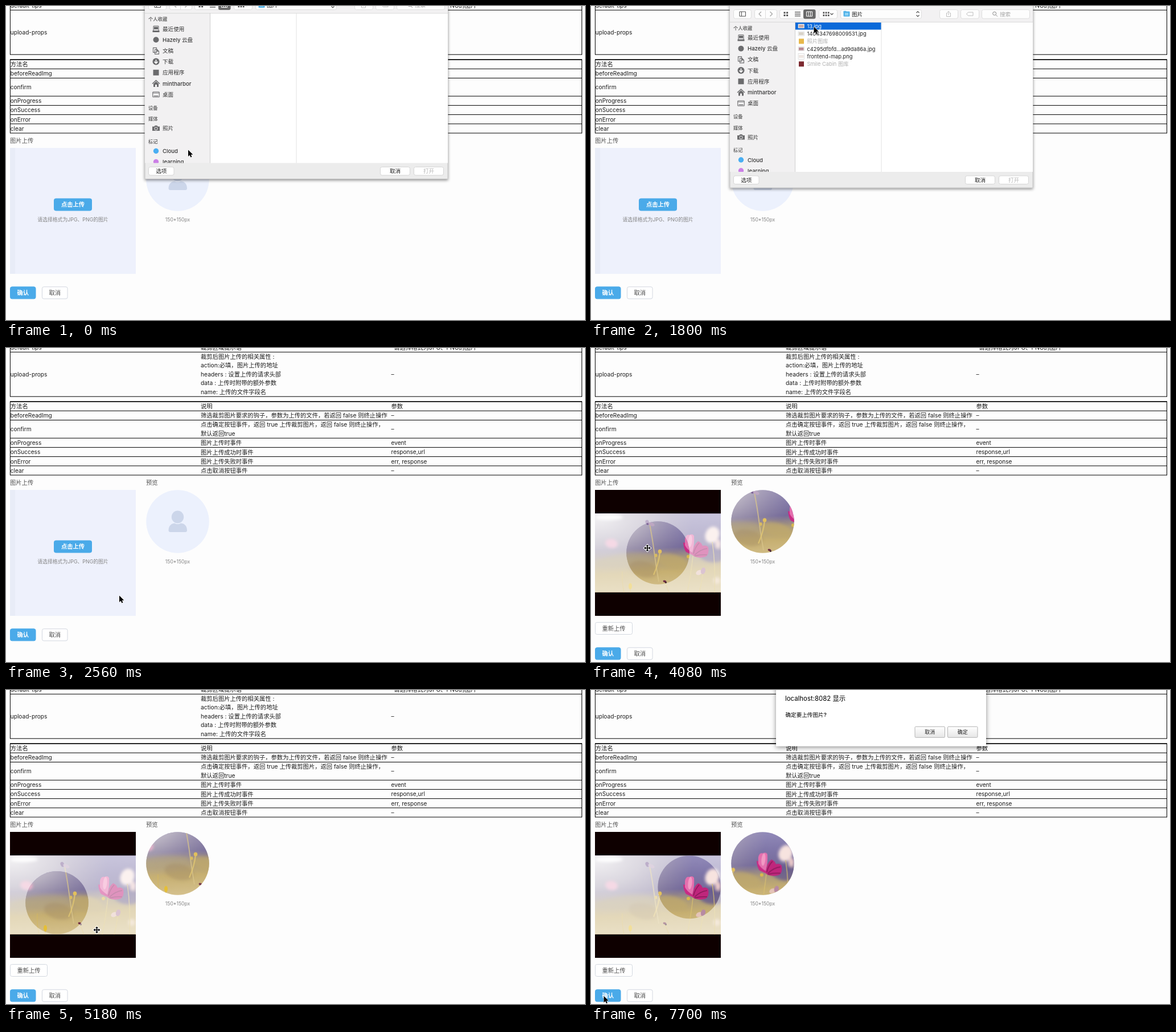
These frames come from a looping animation (1017 px wide and 551 px high, 8000 ms). An HTML page:

```html
<!DOCTYPE html>
<html lang="zh">
<head>
<meta charset="utf-8">
<title>图片上传</title>
<style>
html, body { margin: 0; width: 100%; height: 100%; overflow: hidden; background: #fdfdfd; }
svg { display: block; width: 100%; height: 100%; }
text { font-family: Inter, "Noto Sans CJK SC", "Noto Sans CJK", sans-serif; white-space: pre; }
</style>
</head>
<body>
<svg id="stage" viewBox="0 0 1017 551" preserveAspectRatio="none"></svg>
<script>
const LOOP = 8000;
const stage = document.getElementById('stage');
const $ = id => document.getElementById(id);

// Markup helpers; text is placed by its vertical centre.
const rect = (x, y, w, h, fill, extra = '') =>
  `<rect x="${x}" y="${y}" width="${w}" height="${h}" fill="${fill}" ${extra}/>`;
const circle = (x, y, r, fill, extra = '') =>
  `<circle cx="${x}" cy="${y}" r="${r}" fill="${fill}" ${extra}/>`;
const ellipse = (x, y, rx, ry, fill, turn = 0, extra = '') =>
  `<ellipse rx="${rx}" ry="${ry}" fill="${fill}" transform="translate(${x} ${y}) rotate(${turn})" ${extra}/>`;
const path = (d, stroke, width = 1, fill = 'none', extra = '') =>
  `<path d="${d}" stroke="${stroke}" stroke-width="${width}" fill="${fill}" ${extra}/>`;
const blob = (d, fill) => path(d, 'none', 0, fill);
const text = (x, mid, str, { size = 10.31, fill = '#1c1c1c', weight = 400, anchor = 'start' } = {}) =>
  `<text x="${x}" y="${(mid + size * 0.37).toFixed(2)}" text-anchor="${anchor}" font-weight="${weight}" ` +
  `font-size="${size}" fill="${fill}">${str}</text>`;
const button = (x, y, w, h, label, { fill = '#fff', line = '#d3d8e0', color = '#4a4a4a', size = 10.31, weight = 400, r = 3 } = {}) =>
  rect(x + .5, y + .5, w - 1, h - 1, fill, `rx="${r}" stroke="${line}"`) +
  text(x + w / 2, y + h / 2, label, { size, fill: color, weight, anchor: 'middle' });

const BLUE = '#4aaae9';
const primary = { fill: BLUE, line: BLUE, color: '#fff', weight: 600 };

function tables() {
  const cols = [7.8, 342, 676.5];
  const latin = /^[\x00-\x7f]+$/;
  const cell = (x, mid, s) => text(x, mid, s, { size: latin.test(s) ? 10.08 : 10.31 });
  const row = (mid, ...cells) => cells.map((c, i) => c ? cell(cols[i], mid, c) : '').join('');
  const notes = ['裁剪后图片上传的相关属性 :', 'action:必填，图片上传的地址', 'headers : 设置上传的请求头部',
    'data : 上传时附带的额外参数', 'name: 上传的文件字段名'];
  // Heights in text lines of the rows of the lower table.
  const rules = [7.2, 85.2];
  let y = 94.1;
  for (const lines of [1, 1, 2, 1, 1, 1, 1]) rules.push(y += lines * 15.47 + .74);
  return path(rules.map(v => `M7 ${v.toFixed(2)}H1012`).join('') +
      'M7.4 0V85.2M1011.5 0V85.2M7.4 94V223M1011.5 94V223', '#000') +
    rect(7, 93.3, 1005, 1.7, '#000') +
    row(-1, 'default-tips', '裁剪区域提示语', '"请选择格式为JPG、PNG的图片"') +
    row(46, 'upload-props', '', '–') +
    notes.map((s, i) => text(342, 15 + 15.5 * i, s)).join('') +
    row(102, '方法名', '说明', '参数') +
    row(118.3, 'beforeReadImg', '筛选裁剪图片要求的钩子，参数为上传的文件，若返回 false 则终止操作', '–') +
    row(142, 'confirm', '', '–') +
    text(342, 134.5, '点击确定按钮事件，返回 true 上传裁剪图片，返回 false 则终止操作，') +
    text(342, 150, '默认返回true') +
    row(166.5, 'onProgress', '图片上传时事件', 'event') +
    row(182.7, 'onSuccess', '图片上传成功时事件', 'response,url') +
    row(199, 'onError', '图片上传失败时事件', 'err, response') +
    row(215.3, 'clear', '点击取消按钮事件', '–');
}

function uploader() {
  const grey = { size: 8.84, fill: '#858585', anchor: 'middle' };
  return text(7, 236.5, '图片上传', { fill: '#505050' }) +
    text(246, 236.5, '预览', { fill: '#505050' }) +
    text(301.5, 375, '150*150px', { ...grey, size: 8.6 }) +
    `<g id="empty">` +
      rect(7, 249, 221, 221, '#eef1fc') + rect(7, 249, 9, 221, '#e8ecf7') +
      button(84, 337.5, 67, 22, '点击上传', primary) +
      text(117.5, 375, '请选择格式为JPG、PNG的图片', grey) +
      circle(301.5, 304.5, 55.25, '#ecf1fd') +
      ellipse(301.5, 296.5, 10.7, 11, '#ccd6ea') +
      blob('M285.5 320C285.5 311 292 307.5 296 307.5Q301.5 310.5 307 307.5C312 307.5 318 311 318 320Q318 323 315 323H288.500Q285.500 323 285.500 320Z', '#ccd6ea') +
    `</g>` +
    `<g id="loaded">` +
      rect(7, 249, 221, 221, '#0e0000') +
      `<use href="#photo"/>` + rect(7, 290.5, 221, 138.2, '#fff', 'opacity=".5"') +
      `<g clip-path="url(#cropClip)"><use href="#photo"/></g>` +
      `<g clip-path="url(#viewClip)"><use id="preview" href="#photo"/></g>` +
      button(7, 481, 66, 22, '重新上传') +
    `</g>` +
    `<g id="actions">` + button(7, 492.3, 45.500, 22, '确认', primary) +
      button(63, 492.3, 45.500, 22, '取消') + `</g>`;
}

function photo() {
  const soft = 'filter="url(#soft)"', haze = 'filter="url(#haze)"';
  const stem = (d, c = '#d9c070', w = 1.6) => path(d, c, w, 'none', 'opacity=".75"');
  return `<g id="photo" clip-path="url(#photoClip)">` +
    rect(6, 290, 223, 140, 'url(#sky)') + rect(6, 290, 223, 140, 'url(#glow)') +
    `<g ${haze}>` +
      ellipse(60, 372, 50, 11, '#b3a37f', -6, 'opacity=".5"') +
      ellipse(92, 388, 26, 14, '#a58f66', 12, 'opacity=".45"') +
      ellipse(142, 374, 28, 12, '#bfa86c', 14, 'opacity=".75"') +
      ellipse(212, 362, 24, 14, '#5f5490', 8, 'opacity=".75"') +
      ellipse(32, 297, 24, 5, '#fff', 0, 'opacity=".9"') +
      ellipse(36, 343, 11, 8, '#eab2cb', 10) +
      ellipse(213, 328, 12, 15, '#f7e3df', 25) + ellipse(223, 344, 5, 8, '#eccbc9', 0) +
      ellipse(221, 408, 6, 6, '#e9d3b8') +
    `</g><g ${soft}>` +
      stem('M103 309Q108 335 111 358T119 410', '#d8c58b', 2) +
      stem('M121 358Q119 378 110 398', '#e3c873', 2.4) +
      stem('M179 365Q176 395 169 429M198 385Q195 410 190 429M213 340Q219 380 217 429') +
      stem('M69 416V429M55 392Q54 410 58 429M130 412L137 429', '#d6b95f', 1.2) +
      ellipse(99, 306, 3.2, 4.5, '#7a5f95', -25) + ellipse(106, 309, 6, 3, '#bda7c2', 25) +
      ellipse(121, 357, 3.3, 3.5, '#e2c05c') + ellipse(114, 364, 2.5, 3, '#d9bb60') +
      ellipse(69, 418, 3, 5.5, '#e5bf35') +
      ellipse(190, 394, 6, 4, '#e4c3b8', -25) + ellipse(197, 391, 4, 6, '#b78aa3', 15) +
      blob('M162 341Q163 353 167 358L180 364Q176 350 170 344Z', '#c92b85') +
      blob('M165 335Q167 326 173 328Q179 325 181 330Q182 345 178 359Q168 353 165 346Z', '#e46fae') +
      ellipse(174, 339, 3.5, 11, '#f199c4', 6) +
      blob('M178 361Q180 345 188 339Q194 341 196 347Q203 345 206 350Q208 361 202 366Q190 370 180 365Z', '#bf267c') +
      path('M180 361Q183 349 190 342M182 363Q193 353 204 352M182 365Q193 362 204 363', '#8a1a5a', 1.5) +
      ellipse(171, 366, 3, 3, '#d9b94d') +
    `</g>` +
    ellipse(129.5, 409.5, 3, 1.8, '#702e45', 20) + circle(131.5, 411.5, 1.5, '#3d2130') + `</g>`;
}

const SIDE = '#6b6b6d';
function sidebarIcon(kind, y) {
  const x = 263.5, box = (w, h) => rect(x - w / 2, y - h / 2, w, h, 'none', `rx="1" stroke="${SIDE}" stroke-width="1.1"`);
  const line = d => path(d, SIDE, 1.1, 'none', `transform="translate(${x} ${y})"`);
  const solid = d => path(d, 'none', 0, SIDE, `transform="translate(${x} ${y})"`);
  return {
    recent: () => box(9, 10) + solid('M-6 3H6V6H-6ZM-3.500 -3.500H3.500V1H-3.500Z'),
    drive: () => circle(x, y, 5, SIDE),
    docs: () => line('M-5 -5H1V3H-5ZM-2 -2H2L5 1V6H-2ZM2 -2V1H5'),
    down: () => circle(x, y, 6, SIDE) + path('M0 -3.500V2M-3 0L0 3L3 0', '#fff', 1.6, 'none', `transform="translate(${x} ${y})"`),
    apps: () => rect(x - 5, y - 5, 10, 10, SIDE),
    home: () => solid('M-7 0L0 -6.500L7 0L6 1L0 -4.500L-6 1ZM-4.500 0.500L0 -3.500L4.500 0.500V6H1.500V2H-1.500V6H-4.500Z'),
    desk: () => box(11.5, 9) + line('M-5.500 -2.500H5.500M-4 2.700H4'),
    photos: () => solid('M-6.500 -3H-3L-2 -4.700H2L3 -3H6.500V4.500H-6.500Z') + circle(x, y + .7, 2.6, SIDE, 'stroke="#f2f1f2"')
  }[kind]();
}

function toolbar() {
  const pill = (x, w) => rect(x + .5, 6.5, w, 15.5, '#fdfdfd', 'rx="3" stroke="#dedede"');
  const dark = '#515151';
  const dots = (x, cols, s) => Array.from({ length: cols * 2 }, (_, i) =>
    rect(x + (i % cols) * (s + 1.6), 10.4 + (i / cols | 0) * 4.6, s, 2.9, dark)).join('');
  return [[250, 31], [287, 39], [331, 63], [400, 32], [438, 142], [612, 32], [649, 32], [686, 84]].map(p => pill(...p)).join('') +
    rect(373, 6, 21.5, 16.5, '#696969', 'rx="3"') +
    path('M261 10H271.500V18H261ZM264.500 10V18', dark) +
    path('M306.500 7V22', '#dedede') +
    path('M299 10L295 14L299 18M314.500 10L318.500 14L314.500 18', '#a2a2a2', 1.2) +
    dots(338.5, 2, 3) +
    path('M358 10.500H368M358 13H368M358 15.500H368M358 18H368', dark, 1.1) +
    path('M378.500 10H388.500V18H378.500ZM382 10V18M385.500 10V18', '#fff') +
    dots(407.5, 3, 2.6) +
    path('M420.500 12.800L423 15.200L425.500 12.800', dark, 1.2) +
    rect(443.5, 9.5, 11, 9, '#51b2e8', 'rx="1"') + rect(443.5, 8.7, 5, 3, '#51b2e8', 'rx="1"') + rect(446, 12, 6, 4.5, '#8fd3f5') +
    text(458, 14.2, '图片', { size: 9.6 }) +
    path('M571.500 12L574 9.500L576.500 12M571.500 16L574 18.500L576.500 16', dark, 1.2) +
    path('M626 12.500H624.500V18.500H631.500V12.500H630M628 16V9.500M626 11.300L628 9.300L630 11.300', '#bdbdbd') +
    path('M662.500 11H671V17H662.500L659.500 14Z', '#bdbdbd') +
    circle(708.7, 13.2, 3, 'none', 'stroke="#8c8c8c"') + path('M711 15.500L714 18.500', '#8c8c8c') +
    text(718, 14.2, '搜索', { size: 9.6, fill: '#a6a6a6' });
}

function openDialog() {
  const heads = [['个人收藏', 38.5], ['设备', 194], ['媒体', 213.5], ['标记', 253]];
  const items = [['recent', '最近使用'], ['drive', 'Hazely 云盘'], ['docs', '文稿'], ['down', '下载'],
    ['apps', '应用程序'], ['home', 'mintharbor'], ['desk', '桌面']];
  const label = (s, y) => text(275, y, s, { size: 9.6, fill: '#333', weight: 500 });
  const entry = (kind, s, y) => sidebarIcon(kind, y) + label(s, y);
  const tag = (s, y, color) => circle(263.5, y, 4.7, color) + label(s, y);
  const files = [['13.jpg', '#c9a9a4'], ['1404347698009531.jpg', '#d8d2c8'], ['照片图库', '#e8b84a'],
    ['c4295dfbfd...ad9da86a.jpg', '#b98a92'], ['frontend-map.png', '#eee6e2'], ['Smile Cabin 图库', '#7d2a30']];
  const fileRow = ([name, tone], i) => {
    const y = 35.3 + 13.3 * i, dim = name.endsWith('图库');
    const icon = dim ? rect(365, y - 4.5, 9, 9, tone)
      : rect(364, y - (i > 3 ? 5 : 3.5), 10.5, i > 3 ? 10 : 7, '#fff', 'stroke="#ccc" stroke-width=".6"') + rect(365, y - 2.5, 8.5, 5, tone);
    return icon + text(379.5, y, name, { size: 9.25, fill: i ? dim ? '#b0b0b0' : '#222' : '#fff' });
  };
  return `<g id="picker"><g filter="url(#shade)">` +
    rect(244, -12, 532, 331, '#ececec', 'stroke="#bcbcbc" stroke-width=".8"') + `</g>` +
    rect(244, -12, 532, 40, '#f2f1f2') + toolbar() +
    rect(244, 28, 115, 263, '#f2f1f2') + rect(359, 28, 417, 263, '#fff') +
    path('M244 28.300H776', '#d2d2d2', .8) + path('M358.500 28V291', '#cfcfcf') + path('M510 28V291', '#e2e2e2') +
    `<g clip-path="url(#sideClip)">` +
      heads.map(([s, y]) => text(250, y, s, { size: 8.3, fill: '#6e6e6e', weight: 700 })).join('') +
      items.map(([k, s], i) => entry(k, s, 55.5 + 19.2 * i)).join('') +
      entry('photos', '照片', 230) + tag('Cloud', 270, '#49aef2') + tag('learning', 289, '#cb7fe6') +
    `</g>` +
    `<g id="files">` + rect(359, 29, 150.5, 12.5, '#0a69d9') + files.map(fileRow).join('') + `</g>` +
    [[250, 45.5, '选项', '#222'], [657, 53, '取消', '#222'], [716, 53, '打开', '#b5b5b5']].map(([x, w, s, color]) =>
      button(x, 297.5, w, 15.5, s, { size: 9.6, color, line: '#d6d6d6', weight: 500 })).join('') + `</g>`;
}

function alertBox() {
  const style = { fill: 'url(#key)', line: '#b3b3b3', size: 9, color: '#222', r: 1.5, weight: 500 };
  return `<g id="alert">` + rect(325, -20, 369, 118.5, '#fff', 'filter="url(#shade2)"') +
    text(341, 14.5, 'localhost:8082 显示', { size: 11.4, fill: '#000' }) +
    text(341.5, 43, '确定要上传图片?', { size: 9.6, fill: '#000', weight: 500 }) +
    button(568.5, 63.8, 53.5, 20, '取消', style) + button(626, 63.8, 53.5, 20, '确定', style) + `</g>`;
}

function pointers() {
  const cross = 'M0 -6L2.500 -3H.8V-.8H3V-2.500L6 0L3 2.500V.8H.8V3H2.500L0 6L-2.500 3H-.8V.8H-3V2.500L-6 0L-3 -2.500V-.8H-.8V-3H-2.500Z';
  const hand = 'M3 1Q4.500 -.5 5.300 1V5L9.500 6Q11 6.500 10.500 9L9.500 13H3.500L.3 8.500Q0 7 2 7.500L3 8.300Z';
  const shape = (id, d, fill, line, width = 1) => `<g id="${id}">` + path(d, line, width, fill, 'paint-order="stroke"') + `</g>`;
  return shape('arrow', 'M0 0V11.500L2.700 9L4.400 13L6.400 12.200L4.700 8.200H8.300Z', '#000', '#fff') +
    shape('move', cross, '#000', '#fff', 2) + shape('hand', hand, '#fff', '#000');
}

const clip = (id, body) => `<clipPath id="${id}">${body}</clipPath>`;
const stops = list => list.map(([o, c, a = 1]) => `<stop offset="${o}" stop-color="${c}" stop-opacity="${a}"/>`).join('');
const shadow = (id, dy, blur, a) => `<filter id="${id}" x="-10%" y="-10%" width="120%" height="130%">` +
  `<feDropShadow dx="0" dy="${dy}" stdDeviation="${blur}" flood-opacity="${a}"/></filter>`;

stage.innerHTML = `<defs>` +
  clip('photoClip', rect(7, 290.5, 221, 138.2, '#000')) +
  clip('cropClip', circle(117.5, 359.5, 55.25, '#000', 'id="crop"')) +
  clip('viewClip', circle(301.5, 304.5, 55.25, '#000')) +
  clip('sideClip', rect(244, 28, 114, 263, '#000')) +
  `<linearGradient id="sky" x2=".06" y2="1">` +
    stops([[0, '#968fbd'], [.28, '#7f76a8'], [.46, '#766c9b'], [.6, '#ab9a7a'], [.76, '#c6af71'], [1, '#d4c08c']]) + `</linearGradient>` +
  `<radialGradient id="glow" cx=".03" cy=".05" r=".75">` +
    stops([[0, '#e8e6e8', .95], [.45, '#cdc7ca', .7], [1, '#b5abaa', 0]]) + `</radialGradient>` +
  `<linearGradient id="key" x2="0" y2="1">` + stops([[0, '#fff'], [1, '#e6e6e6']]) + `</linearGradient>` +
  `<filter id="soft"><feGaussianBlur stdDeviation=".6"/></filter>` +
  `<filter id="haze"><feGaussianBlur stdDeviation="2.4"/></filter>` +
  shadow('shade', 2, 2.4, .45) + shadow('shade2', 2, 4, .45) +
  photo() + `</defs>` +
  rect(0, 0, 1017, 551, '#fdfdfd') + tables() + uploader() + openDialog() + alertBox() + pointers();

// Bursts of redraws: start, end, count.
const ticks = [[0, 150, 2], [450, 450, 1], [720, 1050, 3], [1350, 1500, 2], [1800, 2560, 6], [2890, 2890, 1],
  [3340, 3780, 4], [4080, 5030, 7], [5180, 5800, 5], [6240, 6970, 6], [7410, 7700, 3]]
  .flatMap(([a, b, n]) => Array.from({ length: n }, (_, i) => n > 1 ? Math.round(a + (b - a) * i / (n - 1)) : a));

// Keys are [time, x, y].
const pointerKeys = [[0, 320, 252.5], [150, 320, 252.5], [450, 413, 70], [1050, 413, 47], [1500, 391.5, 36.5], [1800, 391.5, 36.5],
  [2100, 372, 100], [2410, 220, 405], [2560, 199, 434.5], [2890, 199, 434.5], [3780, 145, 374], [4080, 99, 351],
  [4400, 75, 350], [4720, 44, 365], [4870, 62, 387], [5030, 112, 412], [5180, 159.5, 421], [5490, 207, 392],
  [5800, 214, 381], [6240, 214.5, 378], [6970, 22.5, 537], [7700, 22.5, 537]];
const cropKeys = [[4080, 117.5, 359.5], [4240, 112, 355], [4560, 78, 355], [4720, 62.5, 363], [4870, 62.3, 371],
  [5030, 66.5, 373.3], [5180, 89.5, 373.3], [5490, 158, 352], [5645, 172.7, 346]];
const pickerKeys = [[0, -15.5], [150, 0], [1800, 0], [1950, -45], [2110, -260], [2250, -345]];
const alertKeys = [[6970, -115], [7410, -66], [7560, -12], [7700, 0]];

function sample(keys, t) {
  const i = keys.findIndex(k => k[0] > t);
  if (i === 0) return keys[0].slice(1);
  if (i < 0) return keys[keys.length - 1].slice(1);
  const a = keys[i - 1], b = keys[i], p = (t - a[0]) / (b[0] - a[0]);
  return a.slice(1).map((v, j) => v + (b[j + 1] - v) * p);
}
const show = (id, on) => $(id).setAttribute('display', on ? 'inline' : 'none');
const shift = (id, x, y) => $(id).setAttribute('transform', `translate(${x} ${y})`);

function draw(now) {
  const t = ticks.filter(k => k <= now).pop();
  const loaded = t >= 2890;
  show('empty', !loaded);
  show('loaded', loaded);
  shift('actions', 0, loaded ? 33 : 0);

  const [cx, cy] = sample(cropKeys, t);
  $('crop').setAttribute('cx', cx);
  $('crop').setAttribute('cy', cy);
  shift('preview', 301.5 - cx, 304.5 - cy);

  show('picker', t < 2250);
  show('files', t >= 450);
  shift('picker', 0, sample(pickerKeys, t)[0]);
  show('alert', t >= 7410);
  shift('alert', 0, sample(alertKeys, t)[0]);

  const kind = t >= 3600 && t < 6240 ? 'move' : t >= 6900 && t < 7500 ? 'hand' : 'arrow';
  for (const id of ['arrow', 'move', 'hand']) show(id, id === kind);
  const [px, py] = sample(pointerKeys, t);
  shift(kind, kind === 'hand' ? px - 3 : px, py);
}

const start = performance.now();
function loop() {
  draw((performance.now() - start) % LOOP);
  requestAnimationFrame(loop);
}
loop();
</script>
</body>
</html>
```
